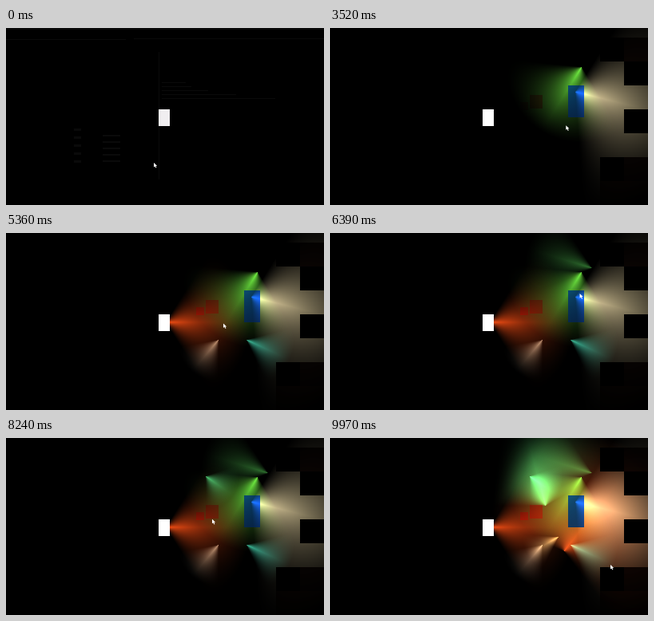
An HTML page with a canvas that plays this animation: 398 by 222 pixels, repeating every 10 s.

```html
<!DOCTYPE html>
<html lang="en">
<head>
<meta charset="utf-8">
<title>Light cones</title>
<style>
html, body { margin: 0; width: 100%; height: 100%; overflow: hidden; background: #000; }
canvas { display: block; }
</style>
</head>
<body>
<canvas id="stage" width="398" height="222"></canvas>
<script>
const W = 398, H = 222, LOOP = 10, FADE = .12;
const player = { x: 191, y: 102, w: 14, h: 21 };
const box = { x: 298, y: 72, w: 20, h: 40 };
const crates = [{ x: 238, y: 93, w: 10, h: 10 }, { x: 250, y: 84, w: 16, h: 17 }];
const ctx = document.getElementById('stage').getContext('2d');

const clamp = v => Math.max(0, Math.min(1, v));
const smooth = v => v * v * (3 - 2 * v);
const inside = (r, x, y) => x >= r.x && x < r.x + r.w && y >= r.y && y < r.y + r.h;
const degrees = (dy, dx) => Math.atan2(dy, dx) * 180 / Math.PI;

// How much red, green and blue the surface at a point gives back
function surface(x, y) {
  if (inside(box, x, y)) return [.08, .3, 1.1];
  if (crates.some(c => inside(c, x, y))) return [1.25, .55, .5];
  const col = Math.floor((x - 338) / 30), row = Math.floor((y - 12) / 30);
  if (col >= 0) {
    if (row % 5 === 0) return col ? [.2, .1, .08] : [0, 0, 0];
    if (row % 2 === 1 && col) return [0, 0, 0];
    if (row > 5) return [.4, .2, .1];
  }
  return [1, 1, 1];
}

// Only what lies ahead of the player is seen, with soft borders
function visible(x, y) {
  const angle = Math.abs(degrees(y - player.y - player.h / 2, x - player.x - player.w / 2));
  return smooth(clamp((84 - angle) / 30));
}

// A cone of light; start in seconds, axis and spread in degrees
function lamp(start, x, y, axis, spread, reach, colour) {
  const canvas = document.createElement('canvas');
  canvas.width = W;
  canvas.height = H;
  const g = canvas.getContext('2d'), image = g.createImageData(W, H);
  const rgb = colour.match(/\w\w/g).map(v => parseInt(v, 16));
  for (let py = 0; py < H; py++) for (let px = 0; px < W; px++) {
    const dx = px + .5 - x, dy = py + .5 - y, i = (py * W + px) * 4;
    const off = Math.abs((degrees(dy, dx) - axis + 900) % 360 - 180);
    const power = clamp(1 - Math.hypot(dx, dy) / reach) ** 1.2
      * clamp(1 - off / spread) * visible(px, py);
    const albedo = surface(px, py);
    rgb.forEach((v, c) => image.data[i + c] = v * power * albedo[c]);
    image.data[i + 3] = 255;
  }
  g.putImageData(image, 0, 0);
  return { start, x, y, canvas };
}

const lamps = [
  lamp(1.5, 307, 80, 14, 72, 160, '#ffebb4'),
  lamp(3, 315, 49, 122, 64, 95, '#78ff46'),
  lamp(4.2, 266, 134, 130, 40, 52, '#a09078'),
  lamp(4.56, 301, 134, 25, 40, 60, '#3cbea0'),
  lamp(4.96, 200, 112, 0, 58, 106, '#ff5014'),
  lamp(5.7, 328, 44, 197, 40, 85, '#327832'),
  lamp(8.12, 250, 48, 35, 55, 42, '#46c878'),
  lamp(8.4, 270, 85, 255, 75, 115, '#50ff82'),
  lamp(9.16, 286, 124, 150, 34, 45, '#fad282'),
  lamp(9.34, 293, 142, 308, 105, 155, '#ff5a1e')
];

// The pointer swings down between the lamps it sets
const stops = [{ start: .76, x: 185, y: 169 }, ...lamps, { start: 9.97, x: 351, y: 159 }];

function pointerAt(t) {
  const n = stops.findIndex(s => s.start > t);
  if (n < 1) return n ? stops[stops.length - 1] : stops[0];
  const a = stops[n - 1], b = stops[n];
  const k = (t - a.start) / (b.start - a.start), e = smooth(k);
  return { x: a.x + (b.x - a.x) * e, y: a.y + (b.y - a.y) * e + 40 * Math.sin(Math.PI * k) };
}

function drawPointer({ x, y }) {
  ctx.save();
  ctx.translate(x, y);
  ctx.fillStyle = '#fff';
  ctx.fill(new Path2D('M0 0V5.5L1.4 4.4L2.5 6.6L3.4 6.1L2.4 4H4.2Z'));
  ctx.restore();
}

// Faint remains of an editor window
function drawGhost(alpha) {
  ctx.globalAlpha = alpha;
  ctx.fillStyle = '#0a0a0a';
  ctx.fillRect(0, 0, W, 2);
  ctx.fillRect(0, 14, 150, 1);
  ctx.fillRect(160, 13, 238, 1);
  ctx.fillRect(191, 30, 1, 160);
  for (let i = 0; i < 5; i++) {
    ctx.fillRect(85, 126 + i * 10, 9, 3);
    ctx.fillRect(121, 134 + i * 8, 22, 2);
    ctx.fillRect(195, 68 + i * 5, 30 + i * i * 7, 1);
  }
  ctx.globalAlpha = 1;
}

function draw(t) {
  ctx.fillStyle = '#000';
  ctx.fillRect(0, 0, W, H);
  if (t < .06) drawGhost(t < .03 ? 1 : .5);

  ctx.globalCompositeOperation = 'lighter';
  for (const { start, canvas } of lamps) {
    ctx.globalAlpha = clamp((t - start) / FADE);
    ctx.drawImage(canvas, 0, 0);
  }
  // The second lamp also lights the box from within
  ctx.globalAlpha = clamp((t - lamps[1].start) / FADE);
  ctx.fillStyle = '#05183a';
  ctx.fillRect(box.x, box.y, box.w, box.h);

  ctx.globalCompositeOperation = 'source-over';
  ctx.globalAlpha = 1;
  ctx.fillStyle = t < .03 ? '#f0eef0' : '#fff';
  ctx.fillRect(player.x, player.y, player.w, player.h);
  drawPointer(pointerAt(t));
}

const begin = performance.now();
function frame() {
  draw((performance.now() - begin) / 1000 % LOOP);
  requestAnimationFrame(frame);
}
frame();
</script>
</body>
</html>
```
